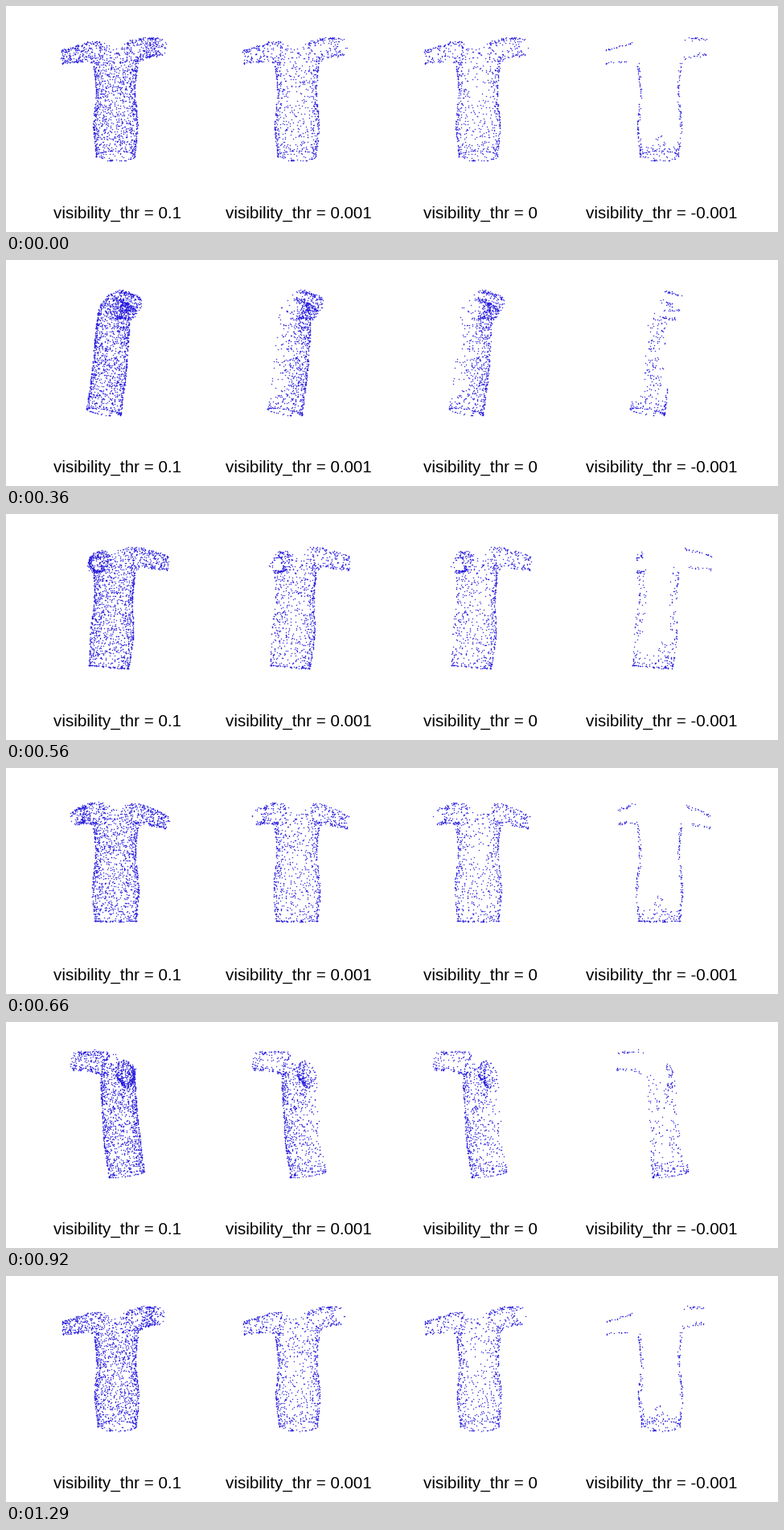
A matplotlib script for the animation above (1.32 s loop, 960x281 px).

```python
import numpy as np
import matplotlib.pyplot as plt
from matplotlib.animation import FuncAnimation

W, H, DPI = 960, 281, 100
LOOP, TICK = 1320, 30
FRAMES = LOOP // TICK
BLUE = "#2318dc"
AXIS_X, MID_Y, GAP = 136, 110, 225.4   # turning axis, eye height, panel spacing
DEPTH, PITCH = 0.0026, 0.05            # perspective and camera tilt
TOP, BOTTOM = 44, 188                  # shoulder and hem heights

rng = np.random.default_rng(11)


def torso(n):
    """Tube of elliptic sections with a scooped neck; columns x, y, z, normal."""
    y = rng.uniform(TOP, BOTTOM, n)
    y[:n // 24] = BOTTOM
    u = rng.uniform(0, 2 * np.pi, n)
    h = (y - TOP) / (BOTTOM - TOP)
    half_w = 26.5 - 1.8 * np.cos(2 * np.pi * (y - 105) / 90) - 7 * np.exp(-25 * h)
    half_d = 21 - 15 * np.exp(-12 * h)
    x, dz = half_w * np.cos(u), half_d * np.sin(u)
    z = dz - 3 - 12 * h ** 2
    neck = TOP - 1 + 9 * (1 - (x / 15) ** 2)
    inside_sleeve = (y < 67) & (np.abs(x) > 21)
    pts = np.column_stack([x, y + 0.17 * dz * h ** 3, z, np.sin(u)])
    return pts[(y > neck) & ~inside_sleeve]


def sleeve(n, side, tip, r_tip):
    """Tapered, slightly arched tube; returns points and position along it."""
    start, tip = np.array([18 * side, 57, -4.0]), np.array(tip, float)
    t = np.minimum(rng.uniform(0.08, 1.05, n), 1)
    v = rng.uniform(0, 2 * np.pi, n)
    axis = tip - start
    across = np.array([-axis[2], 0, axis[0]]) * side
    across /= np.hypot(axis[0], axis[2])
    r = 14 + (r_tip - 14) * t
    pos = start + np.outer(t, axis) + np.outer(r * np.sin(v), across)
    pos[:, 1] += r * np.cos(v) - 2 * np.sin(np.pi * t)
    pos += rng.normal(0, 0.7, pos.shape)
    return np.column_stack([pos, np.sin(v)]), t


body = torso(1430)
left, t_left = sleeve(270, -1, (-64, 65, 11), 8)
right, t_right = sleeve(270, 1, (53, 56, 28), 9)
X, Y, Z, N = np.vstack([body, left, right]).T
along = np.concatenate([np.zeros(len(body)), t_left, t_right])
on_arm = along > 0


def visibility_masks():
    """Choices of points, from all of them down to the outline only."""
    luck = rng.random(X.size)
    hem = ~on_arm & (Y > 176)

    keep = np.select([N > 0, N > -0.6], [0.88, 0.48], 0.06)
    keep = np.where(hem, np.maximum(keep, 0.55), keep)

    chest = ~on_arm & (np.hypot(X / 13, (Y - 97) / 15) < 1)
    fewer = keep * np.where(chest, 0.35, 0.88)

    side = ~on_arm & (np.abs(N) < 0.42) & (Y > 70)
    cuff = (along > 0.38) & (np.abs(N) < 0.42)
    spike = ~on_arm & (N > 0) & (np.abs(X) < 0.32 * (Y - 150))
    edge = np.select([cuff, spike, side | hem], [0.6, 0.9, 0.55], 0)
    return [luck < chance for chance in (1, keep, fewer, edge)]


def project(angle):
    c, s = np.cos(angle), np.sin(angle)
    depth = X * s - Z * c
    scale = 1 / (1 + DEPTH * depth)
    px = AXIS_X + (X * c + Z * s) * scale
    py = MID_Y + (Y - MID_Y) * scale + PITCH * depth
    return px, py


fig = plt.figure(figsize=(W / DPI, H / DPI), dpi=DPI, facecolor="white")
ax = fig.add_axes([0, 0, 1, 1])
ax.set_xlim(0, W)
ax.set_ylim(H, 0)
ax.axis("off")

panels = []
for k, (value, mask) in enumerate(zip(("0.1", "0.001", "0", "-0.001"),
                                      visibility_masks())):
    ax.text(138.7 + k * GAP, 264, f"visibility_thr = {value}", ha="center",
            va="baseline", family="Liberation Sans", fontsize=20.6 * 72 / DPI)
    cloud, = ax.plot([], [], "o", ms=1.08, mew=0, color=BLUE, alpha=0.85)
    panels.append((cloud, mask, k * GAP))


def draw(i):
    px, py = project(2 * np.pi * i / FRAMES)
    for cloud, mask, shift in panels:
        cloud.set_data(px[mask] + shift, py[mask])
    return [cloud for cloud, _, _ in panels]


anim = FuncAnimation(fig, draw, frames=FRAMES, interval=TICK,
                     repeat=True, repeat_delay=0, blit=False)
plt.show()
```
